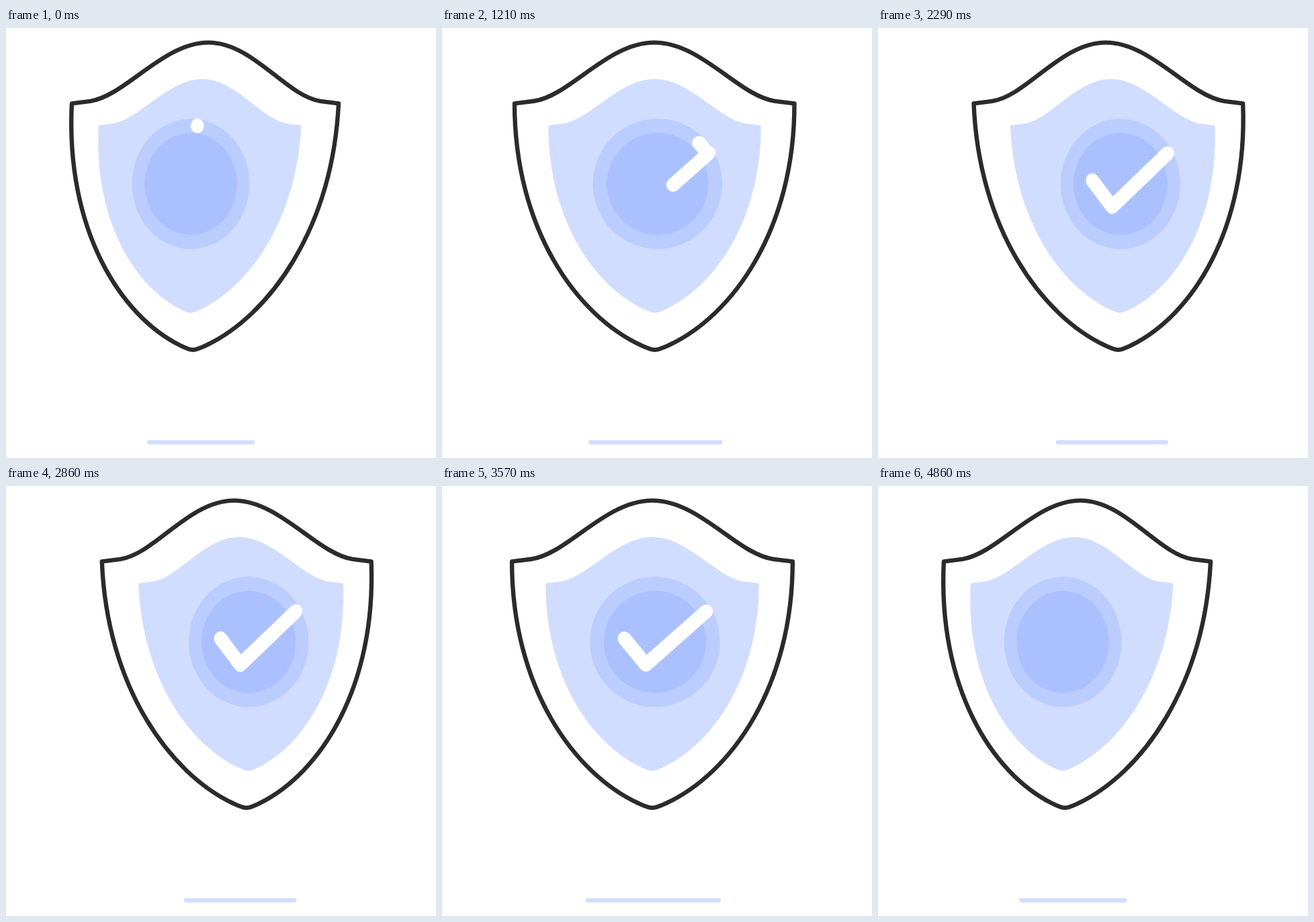
An HTML page with a canvas for the animation above (4930 ms loop, 640 by 640 pixels).

```html
<!DOCTYPE html>
<html lang="en">
<head>
<meta charset="utf-8">
<title>Shield check</title>
<style>
  html, body { margin: 0; height: 100%; overflow: hidden; background: #fff; }
  canvas { display: block; width: 100vmin; height: 100vmin; }
</style>
</head>
<body>
<canvas id="stage" width="640" height="640"></canvas>
<script>
const ctx = document.getElementById('stage').getContext('2d');
const LOOP = 4930;

// time, turn (-1 left .. 1 right), narrowing (0 front .. 1 side), drift in px
const KEYS = [
  [0, -1, 1, 0],
  [500, -.52, .53, -8],
  [1210, .03, .07, -4.5],
  [1790, .49, .8, 1.4],
  [2290, .8, .83, 4],
  [2860, .8, .82, 4.4],
  [3570, 0, .01, -7],
  [4000, -.55, .62, -6.5],
  [4570, -.96, .96, -.7],
  [4860, -1, 1, 0]
];

const SHIELD = new Path2D(`M-209 112.4 L-180 108.8 C-126 101 -70 21.6 0 21.6
  C70 21.6 126 101 180 108.8 L209 112.4 C209 299 117 428 20 472.5
  C12 476.2 6 479 0 479 C-6 479 -12 476.2 -20 472.5
  C-117 428 -209 299 -209 112.4 Z`);

// One sweep clockwise around the ring, ending in the check mark
const RING = 87, START = -1.457, SWEEP = 7.2;
const CHECK_FROM = 629, CHECK_TO = 800;
const MARK = new Path2D();
MARK.arc(0, 0, RING, START, START + 4);
MARK.arc(0, 0, RING, START + 4, START + SWEEP);
MARK.lineTo(77, -46);
MARK.lineTo(-13.5, 34);
MARK.lineTo(-45.5, -5);

const clamp = (v, lo = 0, hi = 1) => Math.min(hi, Math.max(lo, v));
const smooth = u => u * u * (3 - 2 * u);

function key(i) {
  const n = KEYS.length, lap = Math.floor(i / n);
  const [t, ...values] = KEYS[i - lap * n];
  return [t + lap * LOOP, ...values];
}

// Smooth periodic curve through one column of the keys
function track(t, col) {
  let i = KEYS.length - 1;
  while (KEYS[i][0] > t) i--;
  const [a, b, c, d] = [-1, 0, 1, 2].map(o => key(i + o));
  const rate = (p, q) => (q[col] - p[col]) / (q[0] - p[0]);
  const slope = (p, q, r) =>
    ((r[0] - q[0]) * rate(p, q) + (q[0] - p[0]) * rate(q, r)) / (r[0] - p[0]);
  const h = c[0] - b[0], u = (t - b[0]) / h, s = smooth(u);
  return b[col] * (1 - s) + c[col] * s +
    h * u * (1 - u) * ((1 - u) * slope(a, b, c) - u * slope(b, c, d));
}

function shieldMatrix(turn, narrow) {
  const skew = .05 * turn;
  return new DOMMatrix([1 - .05 * narrow, 0, skew, 1, 19 * turn - 22 * skew, 0]);
}

function disc(x, rx, ry, color) {
  ctx.fillStyle = color;
  ctx.beginPath();
  ctx.ellipse(x, 232, rx, ry, 0, 0, 7);
  ctx.fill();
}

function drawMark(t, x, scale) {
  const erase = smooth(clamp((t - 4050) / 550));
  if (erase === 1) return;
  const s = Math.min(t / 1000, 1.79);
  const head = 1.0063 * s * (892 - 447.3 * (s - .5) + 172.6 * (s - .5) * (s - 1.21));
  const tail = CHECK_FROM * (1 - (1 - clamp(t / 1380)) ** 1.55)
    + (CHECK_TO - CHECK_FROM) * erase;
  ctx.save();
  ctx.translate(x, 232);
  ctx.scale(scale, 1);
  ctx.strokeStyle = '#fff';
  ctx.lineWidth = 20.5 / Math.sqrt(scale);
  ctx.setLineDash([Math.max(head - tail, .05), 2000]);
  ctx.lineDashOffset = -tail;
  ctx.stroke(MARK);
  ctx.restore();
}

function draw(t) {
  const turn = track(t, 1), narrow = track(t, 2), x = 320 + track(t, 3);
  const front = 1 - Math.abs(turn);
  ctx.fillStyle = '#fff';
  ctx.fillRect(0, 0, 640, 640);
  ctx.lineCap = ctx.lineJoin = 'round';

  const matrix = shieldMatrix(turn, narrow);
  const outline = new Path2D();
  outline.addPath(SHIELD, new DOMMatrix([1, 0, 0, 1, x, 0]).multiply(matrix));
  ctx.strokeStyle = '#2b2b2d';
  ctx.lineWidth = 6.4;
  ctx.stroke(outline);

  const inner = new Path2D();
  inner.addPath(SHIELD,
    new DOMMatrix([.76, 0, 0, .761, x + 13.5 * turn, 59.5]).multiply(matrix));
  ctx.fillStyle = '#d1ddff';
  ctx.fill(inner);

  const cx = x + 4 * front + 45 * turn;
  const scale = 1 - .098 * narrow;
  disc(cx, 97 * scale, 97, '#bbcdff');
  disc(cx, 76.2 * scale, 76, '#abc1ff');
  drawMark(t, cx, scale);

  const mid = x + 1.4 * front + 30 * turn, half = 97.8 - 21 * narrow;
  ctx.strokeStyle = '#d1ddff';
  ctx.lineWidth = 6.4;
  ctx.beginPath();
  ctx.moveTo(mid - half, 616.6);
  ctx.lineTo(mid + half, 616.6);
  ctx.stroke();
}

const begin = performance.now();
function tick() {
  draw((performance.now() - begin) % LOOP);
  requestAnimationFrame(tick);
}
tick();
</script>
</body>
</html>
```
